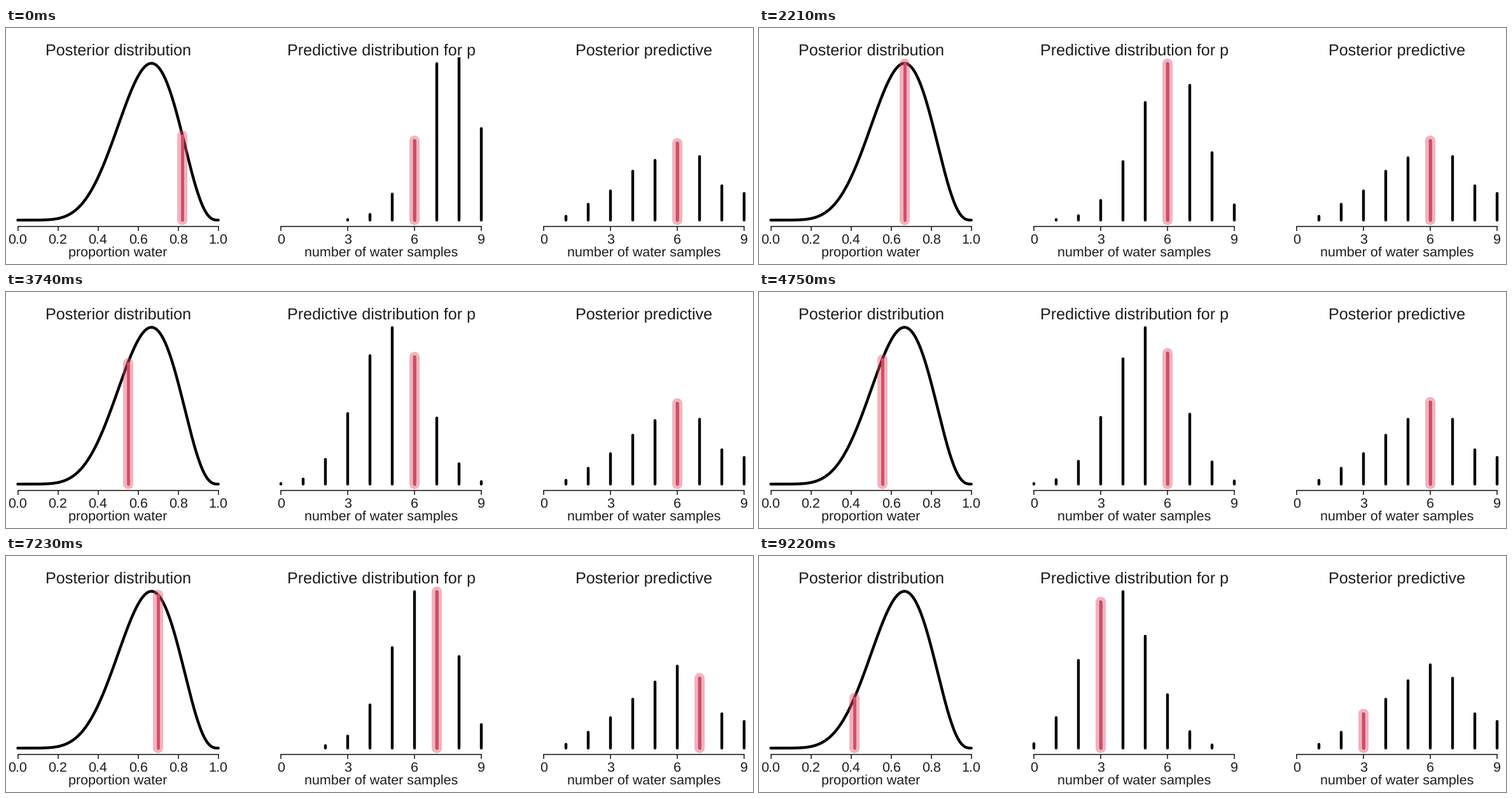
These frames come from a looping animation (1174x371 px, 9300 ms). A matplotlib script:

```python
from math import comb

import matplotlib.pyplot as plt
import numpy as np
from matplotlib.animation import FuncAnimation
from matplotlib.patches import Rectangle

W, H, DPI = 1174, 371, 100
LOOP, STEP = 9300, 50
PX = 72 / DPI

BASE, TOP, PAD = 302, 55.5, 9.9
SPAN = BASE - TOP
LEFTS = (18.5, 432, 845)
WIDTH = 315.2
UNIT = 2.08
INK, RED = "black", "#d64b66"
TEXT = "#1c1c1c"

# start time (ms), sampled proportion, simulated number of water samples
DRAWS = [
    (0, 0.821, 6), (280, 0.83, 5), (620, 0.61, 6), (1150, 0.72, 5),
    (2140, 0.667, 6), (2540, 0.58, 7), (2800, 0.364, 3), (3000, 0.6, 5),
    (3550, 0.549, 6), (4150, 0.376, 5), (4620, 0.556, 6), (4950, 0.62, 7),
    (6200, 0.744, 5), (6490, 0.64, 7), (6780, 0.76, 7), (7200, 0.70, 7),
    (7510, 0.68, 6), (7810, 0.52, 5), (8120, 0.45, 3), (8600, 0.364, 3),
    (9050, 0.417, 3),
]
START = np.array([0, 3, 12, 22, 37, 45, 58, 48, 26, 20])
N = np.arange(10)

plt.rcParams["font.family"] = "Liberation Sans"
plt.rcParams["text.hinting"] = "none"

fig = plt.figure(figsize=(W / DPI, H / DPI), dpi=DPI, facecolor="white")
ax = fig.add_axes([0, 0, 1, 1])
ax.set_xlim(0, W)
ax.set_ylim(H, 0)
ax.axis("off")


def posterior(p):
    return (p / (2 / 3)) ** 6 * ((1 - p) / (1 / 3)) ** 3


def binomial(p):
    return np.array([comb(9, k) * p**k * (1 - p) ** (9 - k) for k in N])


def stroke(x, y, width, color=INK, z=2, **kw):
    line, = ax.plot(x, y, color=color, lw=width * PX, zorder=z,
                    solid_capstyle=kw.pop("cap", "round"), **kw)
    return line


def label(x, y, text, size):
    ax.text(x, y, text, size=size * PX, color=TEXT, ha="center", va="baseline")


def panel(left, title, xlabel, ticks):
    mid = left + WIDTH / 2
    label(mid, 43, title, 25.1)
    label(mid, 358.5, xlabel, 21.5)
    stroke([left, left + WIDTH], [312, 312], 1.6, TEXT, cap="projecting")
    for i, tick in enumerate(ticks):
        x = left + WIDTH * i / (len(ticks) - 1)
        stroke([x, x], [312, 318.5], 1.6, TEXT, cap="butt")
        label(x, 339, tick, 21.5)


def clipped(line):
    line.set_clip_path(Rectangle((0, BASE - SPAN - PAD), W, SPAN + 2 * PAD,
                                 transform=ax.transData))
    return line


def bars(left):
    xs = left + WIDTH * N / 9
    return [clipped(stroke([x, x], [BASE, BASE], 4.4)) for x in xs]


def marker():
    glow = stroke([0, 0], [BASE, BASE], 16, "#df536b", 4, alpha=0.43)
    core = stroke([0, 0], [BASE, BASE], 4.8, RED, 5)
    return clipped(glow), clipped(core)


def place(lines, x, height):
    for line in lines:
        line.set_data([x, x], [BASE, BASE - height])


SAMPLES = "number of water samples"
panel(LEFTS[0], "Posterior distribution", "proportion water",
      [f"{v / 5:.1f}" for v in range(6)])
panel(LEFTS[1], "Predictive distribution for p", SAMPLES, "0369")
panel(LEFTS[2], "Posterior predictive", SAMPLES, "0369")

grid = np.linspace(0, 1, 300)
stroke(LEFTS[0] + WIDTH * grid, BASE - SPAN * posterior(grid), 4.4)

predictive, tally = bars(LEFTS[1]), bars(LEFTS[2])
markers = [marker() for _ in LEFTS]


def update(i):
    past = [d for d in DRAWS if d[0] <= i * STEP]
    _, p, k = past[-1]

    probs = binomial(p)
    # the bar nearest the mean sets the vertical scale
    expected = SPAN * probs / probs[round(9 * p)]
    counts = START + np.bincount([d[2] for d in past[1:]], minlength=10)
    totals = UNIT * counts

    for lines, left, heights in ((predictive, LEFTS[1], expected),
                                 (tally, LEFTS[2], totals)):
        for n, line in enumerate(lines):
            place([line], left + WIDTH * n / 9, heights[n])

    place(markers[0], LEFTS[0] + WIDTH * p, SPAN * posterior(p))
    place(markers[1], LEFTS[1] + WIDTH * k / 9, expected[k])
    place(markers[2], LEFTS[2] + WIDTH * k / 9, totals[k])
    return [*predictive, *tally, *(m for pair in markers for m in pair)]


anim = FuncAnimation(fig, update, frames=LOOP // STEP, interval=STEP,
                     repeat=True, repeat_delay=0, blit=False)
plt.show()
```
